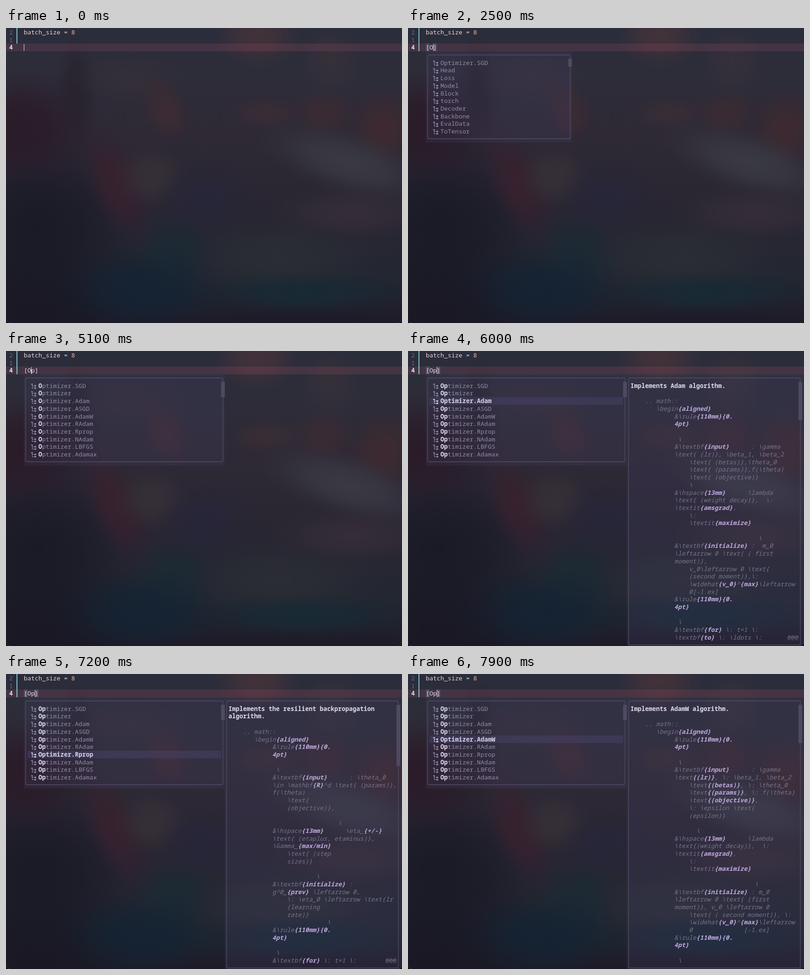
An HTML page with a canvas that plays this animation: 867 by 646 pixels, repeating every 8000 ms.

```html
<!DOCTYPE html>
<html lang="en">
<head>
<meta charset="utf-8">
<title>Completion menu</title>
<style>
  html, body { margin: 0; width: 100%; height: 100%; overflow: hidden; background: #1d1b29; }
  canvas { display: block; }
</style>
</head>
<body>
<canvas id="stage" width="867" height="646"></canvas>
<script>
const W = 867, H = 646, LOOP = 8000;
const CELL = 8, ROW = 16.7, LEFT = 39;
const FONT = '13.333px "Noto Sans Mono", "DejaVu Sans Mono", monospace';
const ctx = document.getElementById('stage').getContext('2d');
const rowTop = row => 0.9 + row * ROW;

// Documentation texts
const ruleStart = String.raw`
    .. math::
       \begin{aligned}
            &\rule{110mm}{0.
            4pt}

             \
`;
const ruleEnd = String.raw`            &\rule{110mm}{0.
            4pt}

             \
            &\textbf{for} \: t=1 \:
            \textbf{to} \: \ldots \:`;

const adamInput = String.raw`            &\textbf{input}      : \gamma
            \text{ (lr)}, \beta_1, \beta_2
                \text{ (betas)},\theta_0
                \text{ (params)},f(\theta)
                \text{ (objective)}
                \
            &\hspace{13mm}      \lambda
            \text{ (weight decay)},  \:
            \textit{amsgrad},
                \:
                \textit{maximize}

                                   \
            &\textbf{initialize} :  m_0
            \leftarrow 0 \text{ ( first
            moment)},
                v_0\leftarrow 0 \text{
                (second moment)},\:
                \widehat{v_0}^{max}\leftarrow
                0[-1.ex]
`;

const adamWInput = String.raw`            &\textbf{input}      : \gamma
            \text{(lr)}, \: \beta_1, \beta_2
                \text{(betas)}, \: \theta_0
                \text{(params)}, \: f(\theta)
                \text{(objective)},
                \: \epsilon \text{
                (epsilon)}

                  \
            &\hspace{13mm}      \lambda
            \text{(weight decay)},  \:
            \textit{amsgrad},
                \:
                \textit{maximize}

                                  \
            &\textbf{initialize} : m_0
            \leftarrow 0 \text{ (first
            moment)}, v_0 \leftarrow 0
                \text{ ( second moment)}, \:
                \widehat{v_0}^{max}\leftarrow
                0              [-1.ex]
`;

const rpropInput = String.raw`            &\textbf{input}      : \theta_0
            \in \mathbf{R}^d \text{ (params)},
            f(\theta)
                \text{
                (objective)},

                              \
            &\hspace{13mm}      \eta_{+/-}
            \text{ (etaplus, etaminus)},
            \Gamma_{max/min}
                \text{ (step
                sizes)}

                        \
            &\textbf{initialize} :
            g^0_{prev} \leftarrow 0,
                \: \eta_0 \leftarrow \text{lr
                (learning
                rate)}
                           \
`;

const variantInput = String.raw`            &\textbf{input}      : \gamma
            \text{ (lr)}, \: \beta_1, \beta_2
                \text{ (betas)}, \: \theta_0
                \text{ (params)}, \:f(\theta)
                \text{ (objective)}, \:
                \lambda \text{
                (weightdecay)},

                  \
            &\hspace{13mm}      \epsilon
            \text{ (epsilon)}

                                  \
            &\textbf{initialize} : m_0
            \leftarrow 0 \text{ ( first
            moment)},
                v_0 \leftarrow 0 \text{
                ( second moment)},
`;

const sgdInput = String.raw`            &\textbf{input}      : \gamma
            \text{ (lr)}, \: \theta_0
                \text{ (params)}, \: f(\theta)
                \text{ (objective)}, \:
                \lambda \text{ (weight decay)},

                  \
            &\hspace{13mm} \:\mu
            \text{ (momentum)}, \:\tau
            \text{ (dampening)},
                \:\textit{ nesterov,}\:
                \textit{ maximize}

                                  \
            &\textbf{initialize} : b_0
                \leftarrow 0[-1.ex]
`;

const mathDoc = (title, input, more = false, thumb = 5) => ({
  lines: (title + '\n' + ruleStart + input + ruleEnd).split('\n'), more, thumb
});
const proseDoc = (text, rows, thumb) => ({ lines: text.split('\n'), rows, thumb });

const docs = [
  { ...mathDoc('Implements stochastic gradient descent\n(optionally with momentum).', sgdInput), top: 2 },
  proseDoc(`Base class for all optimizers.

    .. warning::
        Parameters need to be specified as
        collections that have a deterministic
        ordering that is consistent between
        runs.

Args:
    params (iterable): an iterable of
    tensors or dicts. Specifies what
    Tensors should be optimized.
    defaults: (dict): a dict containing
    default values of optimization
    options.`, 15, 0),
  mathDoc('Implements Adam algorithm.', adamInput, true),
  proseDoc(`Implements Averaged Stochastic Gradient
Descent.

It has been proposed in Acceleration of
stochastic approximation by averaging.

Args:
    params (iterable): iterable of
    parameters to optimize or dicts
    defining parameter groups
    lr (float, optional): learning rate
    (default: 1e-2)
    lambd (float, optional): decay term
    (default: 1e-4)
    alpha (float, optional): power for eta
    update (default: 0.75)
    t0 (float, optional): point at which to
    start averaging (default: 1e6)
    weight_decay (float, optional): weight
    decay (L2 penalty) (default: 0)
    foreach (bool, optional): whether
    foreach implementation of optimizer is
    used (default: None)
    maximize (bool, optional): maximize the
    params based on the objective, instead
    of minimizing (default: False)`, 34, 0),
  mathDoc('Implements AdamW algorithm.', adamWInput),
  mathDoc('Implements RAdam algorithm.', variantInput),
  mathDoc('Implements the resilient backpropagation\nalgorithm.', rpropInput, true, 8),
  mathDoc('Implements NAdam algorithm.', variantInput),
  proseDoc(`Implements L-BFGS algorithm, heavily inspired
by minFunc.

    .. warning::
        This optimizer doesn't support
        per-parameter options and parameter
        groups (there can be only one).

    .. warning::
        Right now all parameters have to be
        on a single device. This will be
        improved in the future.

    .. note::
        This is a very memory intensive
        optimizer. If it doesn't fit in
        memory try reducing the history
        size, or use a different algorithm.

Args:
    lr (float): learning rate (default: 1)
    max_iter (int): maximal number of
    iterations per optimization step
    (default: 20)
    max_eval (int): maximal number of
    function evaluations per optimization
    step (default: max_iter * 1.25).
    tolerance_grad (float): termination
    tolerance on first order optimality
    (default: 1e-5).
    tolerance_change (float): termination
    tolerance on function value/parameter`, 34, 30)
];

const allItems = 'Optimizer.SGD Head Loss Model Block torch Decoder Backbone EvalData ToTensor'.split(' ');
const optimizers = ['SGD', '', 'Adam', 'ASGD', 'AdamW', 'RAdam', 'Rprop', 'NAdam', 'LBFGS', 'Adamax']
  .map(name => name ? 'Optimizer.' + name : 'Optimizer');

// Timeline: each step overrides part of the state from its time on
const steps = [
  [0, { text: '', caret: 0, insert: true, sign: false, menu: null, typed: 0, selected: -1 }],
  [100, { insert: false }],
  [200, { sign: true }],
  [1200, { insert: true }],
  [1800, { text: '[]', caret: 1, sign: false }],
  [1900, { menu: 'all' }],
  [2500, { text: '[O]', caret: 2, sign: true }],
  [2600, { text: '[Op]', caret: 3, menu: 'optimizers', typed: 2 }],
  [3500, { caret: 2, typed: 1 }],
  [3800, { caret: 1, menu: null }],
  [5100, { caret: 2, menu: 'optimizers' }],
  [5300, { caret: 3, typed: 2 }],
  ...[[5600, 0], [5800, 1], [6000, 2], [6100, 3], [6600, 4], [7000, 5], [7200, 6], [7300, 7],
    [7400, 8], [7600, 7], [7700, 6], [7800, 5], [7900, 4]].map(([time, selected]) => [time, { selected }])
];
const stateAt = time => Object.assign({}, ...steps.filter(s => s[0] <= time).map(s => s[1]));

// Drawing helpers
function rect(x, y, w, h, color) {
  ctx.fillStyle = color;
  ctx.fillRect(x, y, w, h);
}

function write(text, x, row, color, style = '500') {
  ctx.font = style + ' ' + FONT;
  ctx.fillStyle = color;
  ctx.fillText(text, x, rowTop(row) + 13);
}

function frame(x, y, right, bottom) {
  ctx.strokeStyle = '#514d64';
  ctx.lineWidth = 1.3;
  ctx.beginPath();
  ctx.roundRect(x, y, right - x, bottom - y, 3);
  ctx.stroke();
}

function paintBackground(g) {
  const base = g.createLinearGradient(0, 0, 0, H);
  [[0, '#2a2d3b'], [.15, '#2d2d39'], [.35, '#2e2935'], [.6, '#292632'], [.85, '#222731'], [1, '#1f1b28']]
    .forEach(([stop, color]) => base.addColorStop(stop, color));
  g.fillStyle = base;
  g.fillRect(0, 0, W, H);

  const blob = (color, x, y, rx, ry, turn = 0) => {
    g.save();
    g.translate(x, y);
    g.rotate(turn);
    g.scale(rx, ry);
    const glow = g.createRadialGradient(0, 0, 0, 0, 0, 1);
    glow.addColorStop(0, color);
    glow.addColorStop(.4, color + 'bb');
    glow.addColorStop(.75, color + '38');
    glow.addColorStop(1, color + '00');
    g.fillStyle = glow;
    g.fillRect(-1, -1, 2, 2);
    g.restore();
  };
  blob('#1a1a27', 70, 430, 250, 210);
  blob('#191824', 60, 620, 300, 190);
  blob('#2a1b28', 30, 220, 190, 140);
  blob('#28222c', 155, 140, 50, 130);
  blob('#342e38', 270, 110, 130, 60);
  blob('#38212f', 240, 340, 65, 140, -.4);
  blob('#3d2b33', 350, 180, 55, 80, -.4);
  blob('#362f37', 320, 325, 85, 75);
  blob('#43323a', 550, 15, 100, 75);
  blob('#35303a', 710, 70, 70, 90);
  blob('#392d35', 570, 187, 85, 40);
  blob('#3a2b33', 695, 185, 80, 60);
  blob('#3e2a30', 825, 220, 80, 95);
  blob('#272639', 430, 375, 110, 90);
  blob('#3a3a44', 750, 295, 210, 75, .3);
  blob('#352d37', 760, 405, 190, 65);
  blob('#2b2d35', 600, 500, 240, 85);
  blob('#1c2a34', 370, 490, 100, 90);
  blob('#142333', 300, 575, 190, 105);
  blob('#182a35', 650, 580, 260, 50);
  blob('#1d1b28', 640, 665, 480, 55);
}

const background = document.createElement('canvas');
background.width = W;
background.height = H;
paintBackground(background.getContext('2d'));

function drawEditor({ text, caret, insert, sign }) {
  rect(0, 34, W, 17, insert ? 'rgba(200,90,110,.16)' : 'rgba(120,120,170,.14)');
  rect(23, 0, 2, sign ? 51 : 34, '#86bfca');
  write('2', 7, 0, '#6b6a82');
  write('1', 7, 1, '#6b6a82');
  write('4', 7, 2, '#e2def0', '700');
  write('batch_size', LEFT, 0, '#efd3d3');
  write('=', LEFT + 11 * CELL, 0, '#c3dbe4');
  write('8', LEFT + 13 * CELL, 0, '#f5c096');

  const matched = text && (caret === 1 || caret === text.length - 1);
  if (matched) {
    for (const col of [0, text.length - 1]) rect(LEFT + col * CELL, 34, CELL, 17, '#534d61');
  }
  write(text, LEFT, 2, '#dcdaee');
  rect(LEFT + caret * CELL, 35, insert ? 1 : CELL, 15, '#e8dcdf');
}

function drawIcon(y, color) {
  rect(55, y + 4, 4, 2, color);
  rect(57, y + 6, 1, 8, color);
  rect(57, y + 8, 4, 1, color);
  rect(57, y + 13, 4, 1, color);
  rect(62, y + 7, 4, 3, color);
  rect(62, y + 12, 4, 3, color);
}

function drawMenu({ menu, typed, selected }) {
  const wide = menu === 'optimizers';
  const right = wide ? 479 : 359;
  rect(39, 51, right - 39, 200, 'rgba(70,65,100,.24)');
  frame(43, 59, right - 4, 242.5);
  (wide ? optimizers : allItems).forEach((item, i) => {
    const row = i + 4, active = i === selected;
    const color = active ? '#d5d1e8' : '#918ba8';
    const prefix = wide ? typed : 0;
    if (active) rect(47, rowTop(row), right - 55, ROW, 'rgba(76,70,112,.4)');
    drawIcon(rowTop(row), color);
    write(item.slice(0, prefix), 71, row, '#e0dcf0', '700');
    write(item.slice(prefix), 71 + prefix * CELL, row, color, active ? '600' : '500');
  });
  rect(right - 8, 67.5, 8, wide ? 33.5 : 17, '#4f4a61');
}

function drawDocLine(line, row) {
  const x = 487;
  if (line[0] !== ' ') return write(line, x, row, '#dedaee', '700');
  let col = line.search(/\S/);
  for (const part of line.trim().split(/(\{[^ {}]+\}|\{0\.$|^4pt\})/)) {
    const strong = /^\{[^ {}]+[}.]$|^4pt\}$/.test(part);
    write(part, x + col * CELL, row, strong ? '#c0a8df' : '#777289', strong ? 'italic 700' : 'italic 500');
    col += part.length;
  }
}

function drawDocs({ lines, rows = 34, top = 3, thumb, more }) {
  const count = rows + 3 - top;
  const y = rowTop(top), bottom = rowTop(top + count + 2);
  rect(479, y, W - 479, bottom - y, 'rgba(70,65,100,.24)');
  frame(483, y + 8, 859, bottom - 8.5);
  lines.slice(0, count).forEach((line, i) => drawDocLine(line, top + 1 + i));
  if (more) write('@@@', 831, top + count, '#777289');
  if (thumb) rect(855, rowTop(top + 1), 8, thumb * ROW, '#4f4a61');
}

function drawCorners() {
  for (const side of [0, 1]) {
    ctx.save();
    if (side) { ctx.translate(W, 0); ctx.scale(-1, 1); }
    ctx.beginPath();
    ctx.moveTo(0, H - 8);
    ctx.quadraticCurveTo(1, H - 1, 8, H);
    ctx.strokeStyle = '#5b5966';
    ctx.lineWidth = 1;
    ctx.stroke();
    ctx.lineTo(0, H);
    ctx.fillStyle = '#0d0d12';
    ctx.fill();
    ctx.restore();
  }
}

function draw(now) {
  const state = stateAt(now % LOOP);
  ctx.drawImage(background, 0, 0);
  drawEditor(state);
  if (state.menu) drawMenu(state);
  if (state.selected >= 0) drawDocs(docs[state.selected]);
  drawCorners();
}

const start = performance.now();
function tick() {
  draw(performance.now() - start);
  requestAnimationFrame(tick);
}
tick();
</script>
</body>
</html>
```
